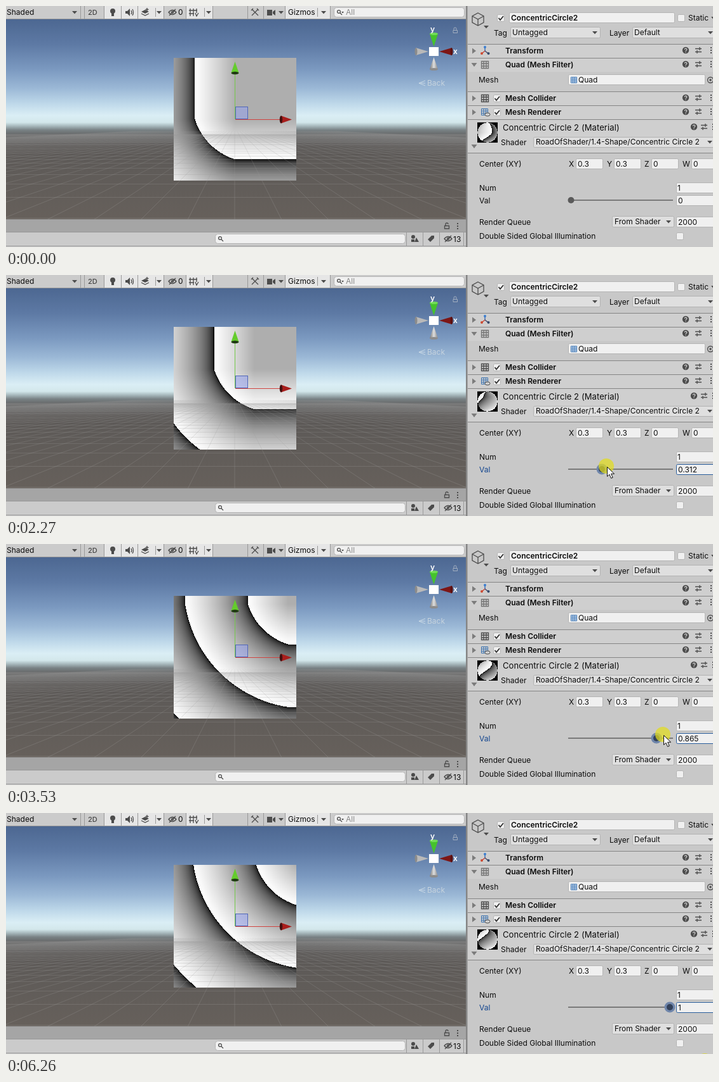
Write an HTML page with a canvas that moves like this. It is 1113x381 px and loops after 6.41 s.

```html
<!DOCTYPE html>
<html lang="en">
<head>
<meta charset="utf-8">
<title>Concentric circle shader</title>
<style>
html, body { margin: 0; width: 100%; height: 100%; overflow: hidden; background: #c8c8c8; }
canvas, svg { position: absolute; left: 0; top: 0; display: block; }
#thumb { left: 742px; top: 184px; }
text { font: 12px Inter, Roboto, sans-serif; fill: #0c0c0c; white-space: pre; }
.b { font-weight: 600; }
.mat { font-size: 13px; letter-spacing: .1px; }
.field { fill: #f0f0f0; stroke: #b4b4b4; }
.drop { fill: #dfdfdf; stroke: #b2b2b2; }
.on { fill: #e6e6e6; }
.sep { stroke: #999; fill: none; }
.ic { fill: none; stroke: #4c4c4c; stroke-width: 1.3; }
.fi { fill: #4c4c4c; }
.focus #valLabel { fill: #12458f; }
.focus #valBox { stroke: #2b5f9e; }
#halo { fill: #6f86ab; display: none; }
.focus #halo { display: inline; }
.focus #core { fill: #33415a; }
</style>
</head>
<body>
<canvas id="scene" width="725" height="338"></canvas>
<svg width="1113" height="381" viewBox="0 0 1113 381">
  <defs>
    <path id="down" d="M-4-2h8l-4 4.5z" fill="#4c4c4c"/>
    <path id="right" d="M-3-4.500v9l6-4.500z" fill="#7c7c7c"/>
    <path id="open" d="M-4.500-3h9l-4.500 6z" fill="#7c7c7c"/>
    <g id="dots" class="fi"><path d="M-1-5h2v2h-2zM-1-1h2v2h-2zM-1 3h2v2h-2z"/></g>
    <g id="help"><circle r="5.200" fill="#4c4c4c"/><path d="M-1.600-1.200a1.700 1.700 0 1 1 2.400 1.500q-.8.4-.8 1.200M0 2.500v1.200" fill="none" stroke="#d4d4d4" stroke-width="1.200"/></g>
    <g id="sliders" class="ic"><path d="M-5-2.500H5M-5 2.500H5M2-5v5M-2 0v5"/></g>
    <g id="gridIcon" class="ic" stroke-width="1"><path d="M-5.500-5.500h11v11h-11zM-2-5.500v11M2-5.500v11M-5.500-2h11M-5.500 2h11"/></g>
    <path id="tick" d="M-3.500 0l2.500 3 5-6" fill="none" stroke="#333" stroke-width="1.800"/>
    <g id="eye" class="ic"><path d="M-6 0q6-7 12 0q-6 7-12 0zM-5 5L5-5"/><circle r="1.600"/></g>
    <g id="lens" class="ic" stroke-width="1.100"><circle cx="-1" cy="-1" r="2.400"/><path d="M1 1l3 3"/></g>
    <g id="lock" class="ic"><path d="M-2-1v-2a2 2 0 0 1 4 0"/><path d="M-3.500-.5h7v4.500h-7z"/></g>
    <linearGradient id="cone"><stop stop-color="#777"/><stop offset=".5" stop-color="#ddd"/><stop offset="1" stop-color="#888"/></linearGradient>
  </defs>

  <!-- move handles -->
  <rect x="361.500" y="159.500" width="19" height="19" fill="#97a3ea" fill-opacity=".58" stroke="#5066b8"/>
  <path d="M360.500 179V106" stroke="#74c94a"/>
  <path d="M361 179.500h72" stroke="#cf4440"/>
  <path d="M354.500 105.500L360.500 88l6 17.500z" fill="#64cc2c"/>
  <ellipse cx="360.500" cy="106" rx="6" ry="2.200" fill="#1f3a12"/>
  <path d="M433 173.500L450 179.500l-17 6z" fill="#a81e1c"/>
  <ellipse cx="433" cy="179.500" rx="2.200" ry="6" fill="#431010"/>

  <!-- orientation gizmo -->
  <path d="M667 44l6.500 20 6.500-20z" fill="#45c32c"/><ellipse cx="673.500" cy="44" rx="6.500" ry="2" fill="#72dc58"/>
  <path d="M667 100l6.500-19 6.500 19z" fill="url(#cone)"/><ellipse cx="673.500" cy="100" rx="6.500" ry="2" fill="#8c8c8c"/>
  <path d="M645 66l20 6-20 6z" fill="#b9b9b9"/><ellipse cx="645.500" cy="72" rx="2" ry="6" fill="#8b8b8b"/>
  <path d="M702 66l-20 6 20 6z" fill="#7d1616"/><ellipse cx="701.500" cy="72" rx="2" ry="6" fill="#5a1010"/>
  <path d="M666 65h15v14h-15z" fill="#fff"/>
  <text class="b" x="668" y="41" style="fill:#fff">y</text><text class="b" x="704" y="76" style="fill:#fff">x</text>
  <path d="M660 118l-10 4 10 4M650 122h10" fill="none" stroke="#c9d9e6"/>
  <text x="663" y="126" style="fill:#c6d3de">Back</text>
  <g transform="translate(707 39)" opacity=".55"><path d="M-2-1v-2a2 2 0 0 1 4 0v2M-3-.5h6.500v4h-6.500z" fill="none" stroke="#ddd"/></g>

  <!-- scene toolbar -->
  <path d="M0 0h725v20H0z" fill="#cbcbcb"/>
  <path class="on" d="M155 0h93v20h-93zM284 0h41v20h-41zM440 0h71v20h-71z"/>
  <path class="sep" d="M0 20.500h725M117.500 0v20M123.500 0v20M154.500 0v20M181.500 0v20M207.500 0v20M235.500 3v14M248.500 0v20M283.500 0v20M312.500 3v14M325.500 0v20M380.500 0v20M405.500 0v20M439.500 0v20M490.500 3v14M510.500 0v20"/>
  <text x="1" y="14">Shaded</text><use href="#down" x="108" y="10"/>
  <text x="129" y="14" style="font-size:11px;font-weight:500;fill:#444">2D</text>
  <circle class="fi" cx="168" cy="8" r="4"/><path class="fi" d="M166 11h4v5h-4z"/>
  <path class="fi" d="M188 8h3l4-4v12l-4-4h-3z"/><path class="ic" d="M197 7q2 3 0 6M199 5q3 5 0 10"/>
  <path class="fi" d="M213 9l6-3 6 3-6 3z"/><path class="ic" d="M213 12l6 3 6-3M222 3v5M219.500 5.500h5"/><use href="#down" x="241" y="10"/>
  <use href="#eye" x="262" y="10"/><text x="271" y="14">0</text>
  <path class="ic" d="M290 4v12M295 4v12M288 7h13M288 12h8M300 4v7M298 11l2 5 3-5"/><use href="#down" x="319" y="10"/>
  <path class="ic" stroke-width="2" d="M387 5l10 10M397 5l-10 10M386 7l3-3M395 4l3 3"/>
  <path class="fi" d="M411 6h8v9h-8zM420 9l4-3v9l-4-3z"/><use href="#down" x="433" y="10"/>
  <text x="444" y="14">Gizmos</text><use href="#down" x="500" y="10"/>
  <rect class="field" x="516.500" y="2.500" width="205" height="15" rx="4"/><use href="#lens" x="525" y="10"/><path class="fi" d="M528 9h4l-2 2.500z"/>
  <text x="535" y="14" style="fill:#888">All</text>

  <!-- lower panel -->
  <path d="M0 337h725v21H0z" fill="#a5a5a5"/><path d="M0 358h725v23H0z" fill="#cbcbcb"/>
  <path class="sep" d="M0 337.500h725M0 357.500h725M0 379.500h725M630.500 358v21M656.500 358v21M682.500 358v21M720.500 358v21"/>
  <use href="#lock" x="694" y="348"/><use href="#dots" x="711" y="348"/>
  <rect class="field" x="329.500" y="360.500" width="299" height="15" rx="4"/><use href="#lens" x="338" y="368"/>
  <circle class="fi" cx="641" cy="365" r="3"/><path class="fi" d="M638 369h5v4h-5zM646 366l4 7h-7z"/>
  <path class="fi" d="M664 369l6-6h4v4l-6 6z"/>
  <use href="#eye" x="696" y="368"/><text x="704" y="373">13</text>

  <!-- inspector -->
  <path d="M724 0h389v381H724z" fill="#c8c8c8"/><path d="M724 0h2.500v381H724z" fill="#858585"/>
  <path d="M727 61h386v43H727zM727 135h386v97H727z" fill="#cfcfcf"/>
  <path d="M727 60.500h386M727 82.500h386M727 135.500h386M727 157.500h386M727 179.500h386M727 232.500h386" stroke="#858585"/>
  <g class="ic" stroke-width="1.500"><path d="M743 11l9 5v10l-9 5-9-5V16zM734 16l9 5 9-5M743 21v10"/></g><use href="#down" x="756" y="33"/>
  <g id="fields"></g>
  <use href="#tick" x="779" y="19"/>
  <text class="b" x="795" y="23">ConcentricCircle2</text><text x="1074" y="23">Static</text><use href="#down" x="1114" y="19"/>
  <text x="768" y="47">Tag</text><text x="797" y="46">Untagged</text><use href="#down" x="927" y="42"/>
  <text x="950" y="47">Layer</text><text x="989" y="46">Default</text><use href="#down" x="1109" y="42"/>
  <g id="heads"></g>
  <g fill="none" stroke-width="1.500"><path d="M754 71v-6" stroke="#3c6fb5"/><path d="M754 71l-5 4" stroke="#c43"/><path d="M754 71l5 4" stroke="#446"/></g>
  <circle cx="754" cy="65" r="2" fill="#3c7fd0"/><circle cx="749" cy="75" r="2" fill="#cc4a32"/><circle cx="759.500" cy="75" r="2" fill="#34496a"/>
  <use href="#gridIcon" x="754" y="93" opacity=".7"/><use href="#gridIcon" x="754" y="146"/>
  <g style="color:#3a72b0"><path d="M748.500 162.500h10v10h-10zM752 162.500v10M755.500 162.500v10M748.500 166h10M748.500 169.500h10" fill="none" stroke="currentColor"/></g><ellipse cx="758" cy="171.500" rx="4" ry="2.600" fill="#cfcfcf" stroke="#4c4c4c"/>
  <use href="#tick" x="773" y="146"/><use href="#tick" x="773" y="168"/>
  <text x="744" y="121">Mesh</text>
  <path d="M889.500 112.500h9v9h-9zM892.500 112.500v9M895.500 112.500v9M889.500 115.500h9M889.500 118.500h9" fill="#dbe8f7" stroke="#3a72b0"/>
  <text x="901" y="121">Quad</text><circle class="ic" cx="1109" cy="117" r="4.500"/><circle class="fi" cx="1109" cy="117" r="1.800"/>
  <text class="mat" x="782" y="197">Concentric Circle 2 (Material)</text>
  <use href="#open" x="737" y="222"/><use href="#help" x="1083" y="191"/><use href="#sliders" x="1099" y="191"/><use href="#dots" x="1113" y="191"/>
  <text x="779" y="220">Shader</text><text x="834" y="219">RoadOfShader/1.4-Shape/Concentric Circle 2</text><use href="#down" x="1108" y="215"/>
  <text x="745" y="254">Center (XY)</text>
  <text x="886" y="254">X</text><text x="900" y="254">0.3</text>
  <text x="946" y="254">Y</text><text x="960" y="254">0.3</text>
  <text x="1005" y="254">Z</text><text x="1019" y="254">0</text>
  <text x="1065" y="254">W</text><text x="1082" y="254">0</text>
  <text x="745" y="292">Num</text><text x="1057" y="292">1</text>
  <text id="valLabel" x="745" y="312">Val</text>
  <rect id="valBox" class="field" x="1055.500" y="299.500" width="70" height="16" rx="2"/>
  <text id="valText" x="1058" y="312">0</text>
  <text x="745" y="346">Render Queue</text><text x="958" y="345">From Shader</text><use href="#down" x="1043" y="341"/><text x="1058" y="346">2000</text>
  <text x="745" y="368">Double Sided Global Illumination</text>
  <path d="M885 306h165v2H885z" fill="#7a7a7a"/>
  <g id="knob"><circle id="halo" r="8.500"/><circle id="core" r="5" fill="#5a5a5a"/></g>
  <circle id="press" r="12" fill="#e2dc1c" fill-opacity=".72"/>
  <path id="cursor" d="M.5.500v15l3.500-3.200 2.600 6 2.600-1.100-2.600-5.900h5z" fill="#fff" stroke="#111"/>
</svg>
<canvas id="thumb" width="32" height="32"></canvas>

<script>
const $ = id => document.getElementById(id);
const LOOP = 6410, HORIZON = 190;

// ---- static panel parts
const box = (cls, x, y, w, h) =>
  `<rect class="${cls}" x="${x + .5}" y="${y + .5}" width="${w}" height="${h}" rx="2"/>`;
$('fields').innerHTML = [
  [792, 10, 260, 16], [885, 108, 215, 16], [897, 241, 42, 16], [957, 241, 42, 16], [1016, 241, 42, 16],
  [1079, 241, 50, 16], [1055, 279, 70, 16], [1055, 333, 70, 16],
  [773, 13, 11, 11], [1057, 13, 11, 11], [767, 140, 11, 11], [767, 162, 11, 11], [1055, 358, 11, 11]
].map(r => box('field', ...r)).join('') + [
  [794, 33, 141, 17], [986, 33, 140, 17], [830, 207, 296, 16], [954, 332, 97, 17]
].map(r => box('drop', ...r)).join('');
$('heads').innerHTML = [
  ['Transform', 71, 'right'], ['Quad (Mesh Filter)', 93, 'open'],
  ['Mesh Collider', 146, 'right'], ['Mesh Renderer', 168, 'right']
].map(([name, y, arrow]) => `<use href="#${arrow}" x="737" y="${y}"/><text class="b" x="786" y="${y + 4}">${name}</text>
  <use href="#help" x="1070" y="${y - 1}"/><use href="#sliders" x="1090" y="${y - 1}"/><use href="#dots" x="1110" y="${y - 1}"/>`).join('');

// ---- shader: rings around (0.3, 0.3), the quarter beyond the origin is clamped
const gamma = c => 255 * (c <= .0031308 ? 12.92 * c : 1.055 * c ** (1 / 2.4) - .055);
function shade(u, v, val) {
  const x = Math.min(2 * u - 1 - val, 0) - .3, y = Math.min(2 * v - 1 - val, 0) - .3;
  return gamma(Math.hypot(x, y) % 1);
}
function fill(img, tone) {
  for (let y = 0, i = 0; y < img.height; y++)
    for (let x = 0; x < img.width; x++, i += 4) {
      img.data[i] = img.data[i + 1] = img.data[i + 2] = tone(x + .5, y + .5);
      img.data[i + 3] = 255;
    }
  return img;
}

const scene = $('scene').getContext('2d'), thumb = $('thumb').getContext('2d');
const quad = scene.createImageData(193, 194), ball = thumb.createImageData(32, 32);
const sky = scene.createLinearGradient(0, 20, 0, 338);
[[20, '#4c6791'], [60, '#5d79a4'], [100, '#7b99c0'], [130, '#9bb8d6'], [155, '#bfd9ea'], [173, '#daeef5'],
 [184, '#d3e7eb'], [190, '#a5b6ba'], [196, '#798285'], [205, '#626262'], [222, '#5c5957'], [338, '#66605b']]
  .forEach(([y, c]) => sky.addColorStop((y - 20) / 318, c));
const haze = scene.createLinearGradient(0, HORIZON, 0, 338);
haze.addColorStop(0, 'rgba(150,150,150,0)');
haze.addColorStop(.12, 'rgba(150,150,150,.22)');
haze.addColorStop(1, 'rgba(160,158,155,.3)');

function drawGrid() {
  scene.strokeStyle = haze;
  scene.lineWidth = 1;
  scene.beginPath();
  for (let n = 3; n < 40; n++) {
    const y = Math.round(HORIZON + 480 / (n + .3)) + .5;
    scene.moveTo(0, y);
    scene.lineTo(725, y);
  }
  for (let k = -40; k <= 40; k++) {
    scene.moveTo(360 + k * 4, HORIZON + 8);
    scene.lineTo(360 + k * 74, 338);
  }
  scene.stroke();
}

function paint(val) {
  scene.fillStyle = sky;
  scene.fillRect(0, 0, 725, 338);
  scene.putImageData(fill(quad, (x, y) => shade(x / 193, 1 - y / 194, val)), 264, 82);
  drawGrid();
  thumb.putImageData(fill(ball, (x, y) => {
    const a = (x - 16) / 15.7, b = (16 - y) / 15.7, zz = 1 - a * a - b * b;
    if (zz < 0) return 0;
    return shade(.25 - Math.atan2(a, Math.sqrt(zz)) / (2 * Math.PI), Math.asin(b) / Math.PI + .5, val);
  }), 0, 0);
}

const ticks = [0];
[[70, 700, 9], [780, 1100, 5], [1410, 1410, 1], [1560, 2200, 9], [2270, 2900, 9], [2990, 3300, 5],
 [3460, 3530, 2], [3620, 3620, 1], [4000, 4160, 3], [4310, 4310, 1], [4460, 4620, 3], [4930, 5410, 7],
 [5640, 5720, 2], [6260, 6260, 1]].forEach(([a, b, n]) => {
  for (let i = 0; i < n; i++) ticks.push(n > 1 ? a + (b - a) * i / (n - 1) : a);
});

const value = [[1480, 0], [1880, .103], [2590, .484], [2990, .671], [3300, .79], [3530, .865], [3620, .88],
  [3920, .88], [4160, .92], [4310, .94], [4620, .981], [5410, 1]];
const path = [[70, 1048, 364], [230, 990, 345], [460, 915, 315], [620, 888, 305], [700, 912, 304], [1100, 895, 307],
  [1480, 895, 307], [1880, 911, 305], [2590, 974, 302], [2990, 1013, 302], [3300, 1028, 302], [3530, 1035, 302],
  [3920, 1037, 302], [4310, 1042, 302], [4620, 1047, 303], [5410, 1060, 305], [5560, 1060, 305], [5640, 1069, 316]];

function at(keys, t, col) {
  const i = keys.findIndex(k => k[0] > t);
  if (i === 0) return keys[0][col];
  if (i < 0) return keys[keys.length - 1][col];
  const a = keys[i - 1], b = keys[i];
  return a[col] + (b[col] - a[col]) * (t - a[0]) / (b[0] - a[0]);
}
const show = (id, on) => $(id).style.display = on ? '' : 'none';
const move = (id, x, y) => $(id).setAttribute('transform', `translate(${x} ${y})`);

let lastTick = -1, lastVal = -1;
function frame(now) {
  const time = now % LOOP;
  let t = 0;
  for (const k of ticks) if (k <= time) t = k;
  if (t !== lastTick) {
    lastTick = t;
    const val = at(value, t, 1), x = Math.round(at(path, t, 1)), y = Math.round(at(path, t, 2));
    if (val !== lastVal) paint(lastVal = val);
    document.body.classList.toggle('focus', t >= 1560);
    $('valText').textContent = +val.toFixed(3);
    move('knob', 889.5 + val * 155.5, 307);
    move('cursor', x, y);
    show('cursor', t >= 70 && t < 5720);
    const parting = t >= 6260;
    show('press', parting || t >= 1410 && t < 5640);
    if (parting) move('press', 1100, 392);
    else move('press', x - 1, y - 1);
  }
  requestAnimationFrame(frame);
}
frame(0);
</script>
</body>
</html>
```
